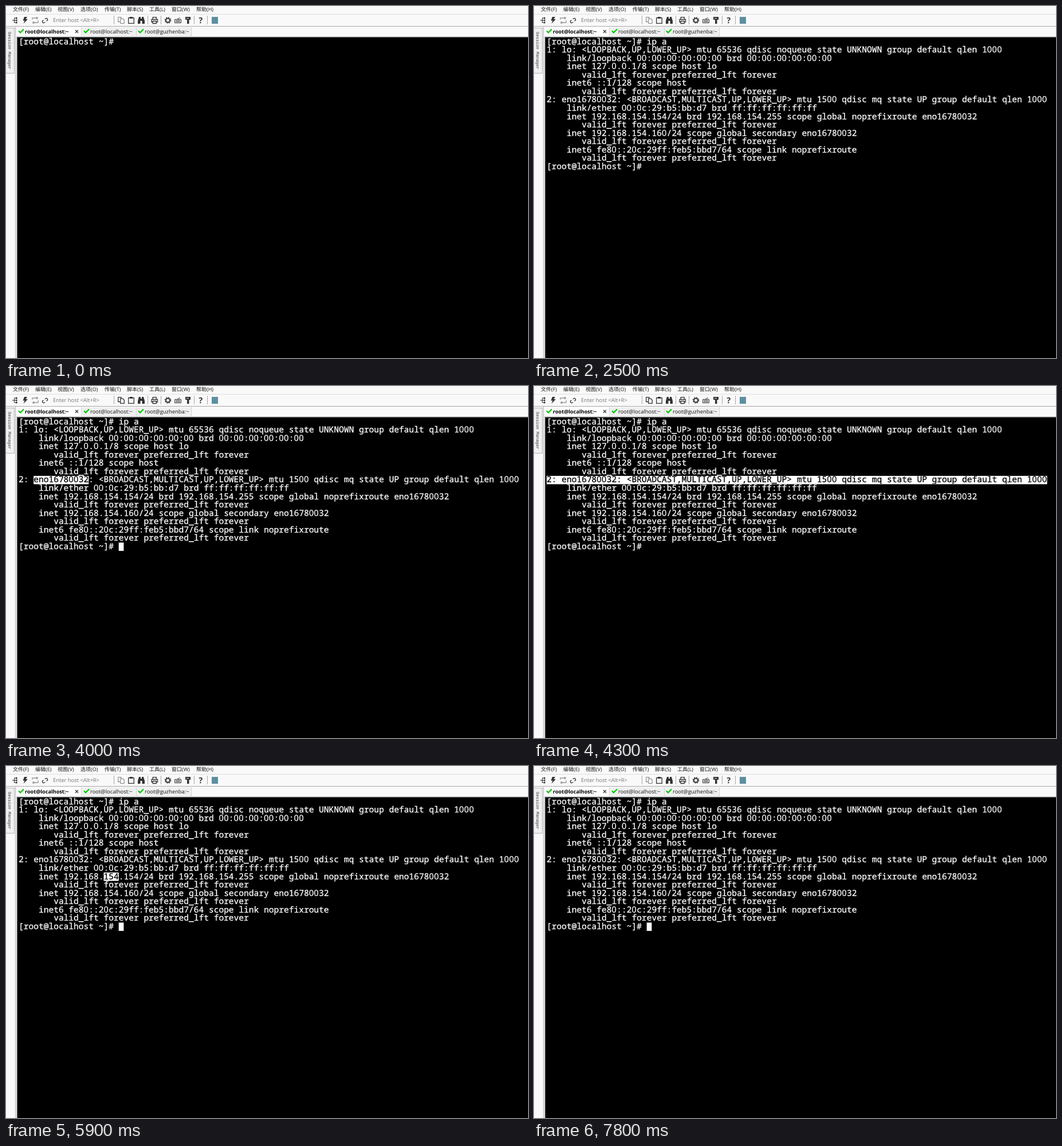
Write an HTML page that moves like this. It is 911 px wide and 615 px high and loops after 8000 ms.

```html
<!DOCTYPE html>
<html lang="zh-CN">
<head>
<meta charset="utf-8">
<title>Terminal session</title>
<style>
  html, body { margin: 0; width: 100%; height: 100%; overflow: hidden; background: #f9f9f9; }
  svg { display: block; width: 911px; height: 615px; }
  text { text-rendering: geometricPrecision; white-space: pre; }
  .ui { font: 9.4px "Open Sans", "Noto Sans CJK SC", "Noto Sans CJK", sans-serif; fill: #111; }
  .menu { font-size: 9px; }
  .bold { font-size: 9.1px; font-weight: 700; fill: #000; }
  .hint { fill: #777; }
  .side { font: 7.3px "Liberation Mono", monospace; fill: #333; }
  .term { font: 14.55px "Noto Sans Mono", "DejaVu Sans Mono", monospace; fill: #fff; stroke: #fff; stroke-width: .3; }
  .zero { font-family: "Open Sans", sans-serif; }
  .crisp { shape-rendering: crispEdges; }
  .line { fill: none; stroke: #333; stroke-width: 1.3; }
  .thin { stroke-width: 1; }
  .pale { stroke: #999; }
  .solid { fill: #333; }
  .check { fill: none; stroke: #08c808; stroke-width: 2.4; }
  .help { font: 700 14px "Open Sans", sans-serif; fill: #333; }
  #screen { isolation: isolate; }
  #sel { fill: #fff; mix-blend-mode: difference; }
</style>
</head>
<body>
<svg viewBox="0 0 911 615">
  <g class="crisp">
    <rect width="911" height="615" fill="#f9f9f9"/>
    <rect y="14" width="911" height="1" fill="#dedede"/>
    <rect y="35" width="911" height="1" fill="#a8a8a8"/>
    <rect x="19" y="36" width="112" height="17" fill="#fff"/>
    <rect x="131" y="37" width="192" height="16" fill="#f0f0f0"/>
    <path d="M131.5 37V53M227.5 37V53M323.5 37V53" stroke="#d4d4d4"/>
    <rect x="16" y="36" width="1" height="579" fill="#b4b4b4"/>
    <rect x="18" y="53" width="893" height="562" fill="#d0d0d0"/>
    <rect x="19" y="54" width="892" height="561" fill="#747474"/>
    <rect x="-.5" y="38.5" width="15" height="79" fill="#f0f0f0" stroke="#b4b4b4"/>
    <path d="M188.5 17V32M247.5 17V32M270.5 17V32M328.5 17V32M351.5 17V32" stroke="#a8a8a8"/>
  </g>
  <text class="side" transform="translate(3.5 45) rotate(90)">Session Manager</text>

  <g id="menu"></g>
  <text class="ui hint" x="82" y="28">Enter host &lt;Alt+R&gt;</text>

  <!-- toolbar -->
  <path class="line thin" d="M11 25H17M14.5 21V29M14.5 21H17M14.5 29H17"/>
  <path class="solid" d="M17 19.8h2.6v2.6H17zM17 23.7h2.6v2.6H17zM17 27.6h2.6v2.6H17z"/>
  <path class="solid" d="M32 19H37L34.5 23H38L30.5 31L32.5 25.5H29.5Z"/>
  <path class="line pale" d="M46 24V21H55M53 19L55.5 21L53 23M56 25V29H47M49 27L46.5 29L49 31"/>
  <g transform="rotate(-38 68 25.5)">
    <path class="line" d="M66.500 23.300H65a2.200 2.200 0 0 0 0 4.400H66.500M69.500 23.300H71a2.200 2.200 0 0 1 0 4.400H69.500"/>
  </g>
  <path id="copy" class="line" d="M199 27.5H195.7V19.7H201V22M199.7 22.2H204L206.3 24.5V30.3H199.7Z"/>
  <path class="line" d="M213.7 20.7H223.3V30.3H213.7Z"/>
  <path class="solid" d="M216 19h5v3h-5z"/>
  <path class="solid" d="M232 19h3v3h2v-3h3l2 7v5h-4.5v-5h-3v5H230v-5z"/>
  <path class="line" d="M256.2 23V19.7H262.3V23M256 28H254V23.5H264.5V28H262.5M256.2 26.5H262.3V30.5H256.2Z"/>
  <circle class="line" cx="282.5" cy="25" r="3.5" style="stroke-width:2"/>
  <circle class="line" cx="282.5" cy="25" r="5.2" style="stroke-dasharray:2 2.084"/>
  <path class="line thin" d="M294.5 23.5H305.5V29.5H294.5ZM296 25.5H304M296 27.5H304M299 23L304 20.5"/>
  <path class="solid" d="M313 19H322V24H319.5V31H316V24H313Z"/>
  <path d="M315 21.5H319" stroke="#f9f9f9"/>
  <text class="help" x="336.5" y="30">?</text>
  <rect class="crisp" x="359" y="19" width="11" height="12" fill="#5d8fa0"/>

  <!-- tabs -->
  <path class="check" d="M22 43.5L25 46.5L31 40.5M136 43.5L139 46.5L145 40.5M231 43.5L234 46.5L240 40.5"/>
  <text class="ui bold" x="33" y="47.5">root@localhost:~</text>
  <path class="line" d="M121 42L126 47M126 42L121 47"/>
  <text class="ui" x="147" y="47.5">root@localhost:~</text>
  <text class="ui" x="242" y="47.5">root@guzhenba:~</text>

  <g id="screen">
    <rect x="20" y="55" width="891" height="560"/>
    <g id="command"></g>
    <g id="output"></g>
    <rect id="cursor" fill="#fff"/>
    <rect id="sel"/>
  </g>
</svg>

<script>
const LOOP = 8000, LEFT = 22, TOP = 55, CELL = 8.735, ROW = 14.57;
const PROMPT = '[root@localhost ~]# ', COMMAND = 'ip a';
const LIFETIME = '       valid_lft forever preferred_lft forever';
const OUTPUT = [
  '1: lo: <LOOPBACK,UP,LOWER_UP> mtu 65536 qdisc noqueue state UNKNOWN group default qlen 1000',
  '    link/loopback 00:00:00:00:00:00 brd 00:00:00:00:00:00',
  '    inet 127.0.0.1/8 scope host lo',
  LIFETIME,
  '    inet6 ::1/128 scope host',
  LIFETIME,
  '2: eno16780032: <BROADCAST,MULTICAST,UP,LOWER_UP> mtu 1500 qdisc mq state UP group default qlen 1000',
  '    link/ether 00:0c:29:b5:bb:d7 brd ff:ff:ff:ff:ff:ff',
  '    inet 192.168.154.154/24 brd 192.168.154.255 scope global noprefixroute eno16780032',
  LIFETIME,
  '    inet 192.168.154.160/24 scope global secondary eno16780032',
  LIFETIME,
  '    inet6 fe80::20c:29ff:feb5:bbd7/64 scope link noprefixroute',
  LIFETIME,
  PROMPT
];

// Selections: row, first column, end column
const DEVICE = [7, 3, 14], DEVICE_LINE = [7, 0, 100];
const OCTET = [9, 17, 20], INET_LINE = [9, 0, 86], SECOND = [11, 21, 24];

// Each step changes only the listed parts of the state
const STEPS = [
  [0, { typed: 0, out: false, cur: false, sel: null, copy: false }],
  [900, { cur: true }],
  [1300, { typed: 1 }],
  [1400, { cur: false }],
  [1500, { typed: 2, cur: true }],
  [1700, { typed: 3 }],
  [1800, { typed: 4 }],
  [2300, { cur: false }],
  [2500, { out: true }],
  [2600, { cur: true }],
  [3300, { cur: false }],
  [3800, { cur: true }],
  [3900, { sel: DEVICE }],
  [4000, { copy: true }],
  [4300, { cur: false, sel: DEVICE_LINE }],
  [4700, { sel: DEVICE }],
  [4800, { cur: true }],
  [5200, { cur: false }],
  [5700, { cur: true }],
  [5800, { sel: null }],
  [5900, { sel: OCTET, copy: false }],
  [6000, { copy: true }],
  [6200, { cur: false }],
  [6300, { sel: INET_LINE }],
  [6700, { cur: true }],
  [7200, { cur: false, sel: null, copy: false }],
  [7300, { sel: SECOND, copy: true }],
  [7700, { cur: true }],
  [7800, { sel: null, copy: false }]
];

const $ = id => document.getElementById(id);
const colX = c => LEFT + c * CELL;
const rowY = r => TOP + r * ROW;
const escapeText = s => s.replace(/&/g, '&amp;').replace(/</g, '&lt;').replace(/>/g, '&gt;');

// One line of terminal text, each character set in its own cell
function termLine(line, row) {
  const body = line.trim(), indent = line.search(/\S/);
  const xs = [...body].map((_, i) => colX(indent + i).toFixed(2)).join(' ');
  const inner = escapeText(body).replace(/0+/g, '<tspan class="zero">$&</tspan>');
  return `<text class="term" x="${xs}" y="${(rowY(row) + 11.5).toFixed(2)}">${inner}</text>`;
}

function place(rect, box) {
  rect.style.display = box ? '' : 'none';
  if (!box) return;
  const [row, from, to] = box;
  rect.setAttribute('x', colX(from));
  rect.setAttribute('y', rowY(row));
  rect.setAttribute('width', (to - from) * CELL);
  rect.setAttribute('height', ROW);
}

const MENU = [
  [12, '文件(F)'], [51, '编辑(E)'], [90, '视图(V)'], [130, '选项(O)'], [172, '传输(T)'],
  [211, '脚本(S)'], [250, '工具(L)'], [289, '窗口(W)'], [332, '帮助(H)']
];
$('menu').innerHTML = MENU.map(([x, s]) => `<text class="ui menu" x="${x}" y="9">${s}</text>`).join('');
$('output').innerHTML = OUTPUT.map((s, i) => termLine(s, i + 1)).join('');

let shown = -1;
function render(t) {
  const count = STEPS.filter(([at]) => at <= t).length;
  if (count === shown) return;
  shown = count;
  const s = Object.assign({}, ...STEPS.slice(0, count).map(step => step[1]));
  const col = PROMPT.length + (s.out ? 0 : s.typed);
  $('command').innerHTML = termLine(PROMPT + COMMAND.slice(0, s.typed), 0);
  $('output').style.display = s.out ? '' : 'none';
  place($('cursor'), s.cur && [s.out ? OUTPUT.length : 0, col, col + 1]);
  place($('sel'), s.sel);
  $('copy').classList.toggle('pale', !s.copy);
}

function tick() {
  render(performance.now() % LOOP);
  requestAnimationFrame(tick);
}
tick();
</script>
</body>
</html>
```
